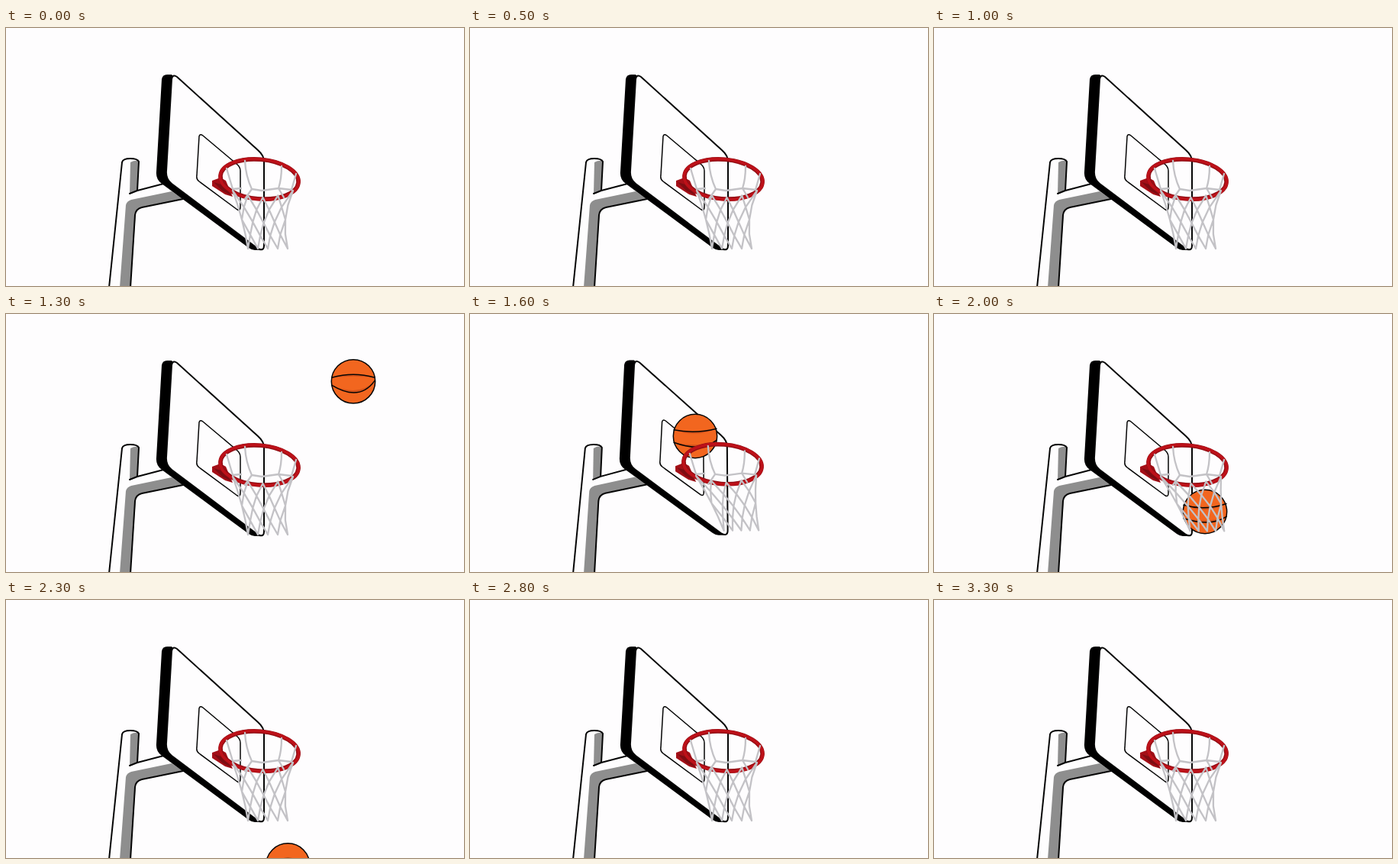
Write an HTML page that moves like this. It is 600 px wide and 338 px high and loops after 4.1 s.

```html
<!DOCTYPE html>
<html lang="en">
<head>
<meta charset="utf-8">
<title>Basketball shot</title>
<style>
html, body { margin: 0; width: 100%; height: 100%; overflow: hidden; background: #fefdfe; }
svg { display: block; width: 100vw; height: 100vh; }
.line { fill: none; stroke: #050505; stroke-width: 2; stroke-linecap: round; stroke-linejoin: round; }
.thin { stroke-width: 1.5; }
.face { fill: #fefdfe; }
.shade { fill: #8e8e8e; }
.net { fill: none; stroke: #c3c2c6; stroke-width: 2.3; stroke-linecap: round; stroke-linejoin: round; }
</style>
</head>
<body>
<svg viewBox="0 0 600 338">
  <g class="sway">
    <!-- post and arm -->
    <path class="face" d="M152 174Q162 169 174 174L172 213L214 202L234 223L180 234Q171 236 170 243L163 340H135Z"/>
    <path class="shade" d="M163 176Q168 173 174 174L172 213L162 217Z"/>
    <path class="shade" d="M157 232Q158 227 164 225L217 214L232 224L180 234Q171 236 170 243L163 340H149Z"/>
    <path class="line" d="M135 340L152 176Q153 171 163 171Q172 171 174 175L172 213L214 202M163 340L169 245Q170 237 178 235L232 224M162 217L172 213"/>
    <!-- board -->
    <path d="M204 67Q205 61 211 61H217L232 80L225 190L330 283L338 287Q337 292 331 291H326Q322 291 318 288L204 204Q196 198 197 188Z"/>
    <path class="line face" d="M217 67Q218 60 224 64L330 160Q338 167 338 175V285Q338 293 330 289L217 204Q209 198 210 187Z"/>
    <path class="line thin" d="M253 142Q254 138 258 141L302 178Q307 182 307 187V235Q307 240 303 238L253 201Q249 198 250 193Z"/>
    <path fill="#a40f17" d="M270 200L281 196L288 200L297 221L287 218L270 207Z"/>
    <path fill="#7d0c12" d="M272 202L285 206L296 220L283 213Z"/>
  </g>
  <g id="ball">
    <circle r="28.7" fill="#f2661f"/>
    <path id="shade" fill="#d4531a"/>
    <path id="seams" class="line thin"/>
    <circle class="line thin" r="28.7"/>
  </g>
  <g class="sway">
    <g transform="rotate(5 332 198)" fill="none">
      <ellipse cx="332" cy="198" rx="51.2" ry="25.8" stroke="#8f0d14" stroke-width="5.6"/>
      <ellipse cx="332" cy="198" rx="51.7" ry="26.2" stroke="#bd1119" stroke-width="3.8"/>
    </g>
    <path id="net" class="net"/>
  </g>
</svg>
<script>
const LOOP = 4100, STEP = 100;
const $ = id => document.getElementById(id);
const sways = document.querySelectorAll('.sway');

// entry, board, rim, net, exit
const path = [
  { t: 1100, x: 675, y: 30 }, { t: 1460, x: 279, y: 135 }, { t: 1600, x: 295, y: 160 },
  { t: 2000, x: 355, y: 259 }, { t: 2420, x: 375, y: 383 }
];

const mix = (a, b, p) => a + (b - a) * p;
const bump = (t, from, to) => t > from && t < to ? Math.sin(Math.PI * (t - from) / (to - from)) : 0;

function ballAt(t) {
  const time = Math.min(Math.max(t, path[0].t), path[path.length - 1].t);
  const i = Math.max(1, path.findIndex(k => k.t >= time));
  const a = path[i - 1], b = path[i], p = (time - a.t) / (b.t - a.t);
  return [mix(a.x, b.x, p), mix(a.y, b.y, p)];
}

// quadratic through a, m and b
const bow = (a, m, b, v) => a * (1 - v) * (1 - 2 * v) + 4 * m * v * (1 - v) + b * v * (2 * v - 1);

function netPath(swing) {
  const rows = 4, cols = 4;
  const knot = (u, r) => {
    const v = r / rows;
    const left = bow(297, 309 + 10 * swing, 317 + 20 * swing, v);
    const right = bow(376, 366 + 11 * swing, 369 + 12 * swing, v);
    const y = mix(213 + 9 * Math.sin(Math.PI * u), 289 - 5 * swing, v);
    return mix(left, right, u).toFixed(1) + ' ' + y.toFixed(1);
  };
  // strings and loops on the far side of the hoop
  let d = 'M289 184L297 211L308 210M313 174Q314 194 322 211L335 213L357 210L374 212' +
    'M361 181Q361 198 357 210M380 191L374 212M322 211L313 224M357 210L364 222';
  for (let r = 0; r < rows; r++)
    for (let i = 0; i < cols; i++) {
      const mid = (i + .5) / cols;
      for (const side of [i / cols, (i + 1) / cols])
        d += r % 2 ? `M${knot(mid, r)}L${knot(side, r + 1)}` : `M${knot(side, r)}L${knot(mid, r + 1)}`;
    }
  for (const u of [0, 1]) {
    d += 'M' + knot(u, 0);
    for (let r = 1; r <= rows; r++) d += 'L' + knot(u, r);
  }
  return d;
}

function drawBall(t, roll) {
  const [x, y] = ballAt(t);
  const top = -5 - 4 * roll, low = 5 + 4 * roll, end = 8 * roll - 1;
  const upper = `M-28 ${top}Q0 ${-13 + 13 * roll} 28 ${top - 2 * roll}`;
  const lower = `M-28 ${low}Q8 ${27 - 7 * roll} 28 ${end}`;
  $('ball').setAttribute('transform', `translate(${x} ${y})`);
  $('seams').setAttribute('d', upper + lower);
  $('shade').setAttribute('d',
    `${upper}Q0 ${-8 + 13 * roll} -28 ${top}Z${lower}Q8 ${21 - 7 * roll} -28 ${low}Z`);
}

function draw(t) {
  const swing = Math.sqrt(bump(t, 1400, 2300));
  const angle = -.43 * bump(t, 1400, 1900);
  drawBall(t, swing);
  sways.forEach(g => g.setAttribute('transform', `rotate(${angle} 150 338)`));
  $('net').setAttribute('d', netPath(swing));
}

const start = performance.now();
function tick(now) {
  const t = Math.max(0, now - start) % LOOP;
  draw(Math.floor(t / STEP) * STEP);
  requestAnimationFrame(tick);
}
draw(0);
requestAnimationFrame(tick);
</script>
</body>
</html>
```
